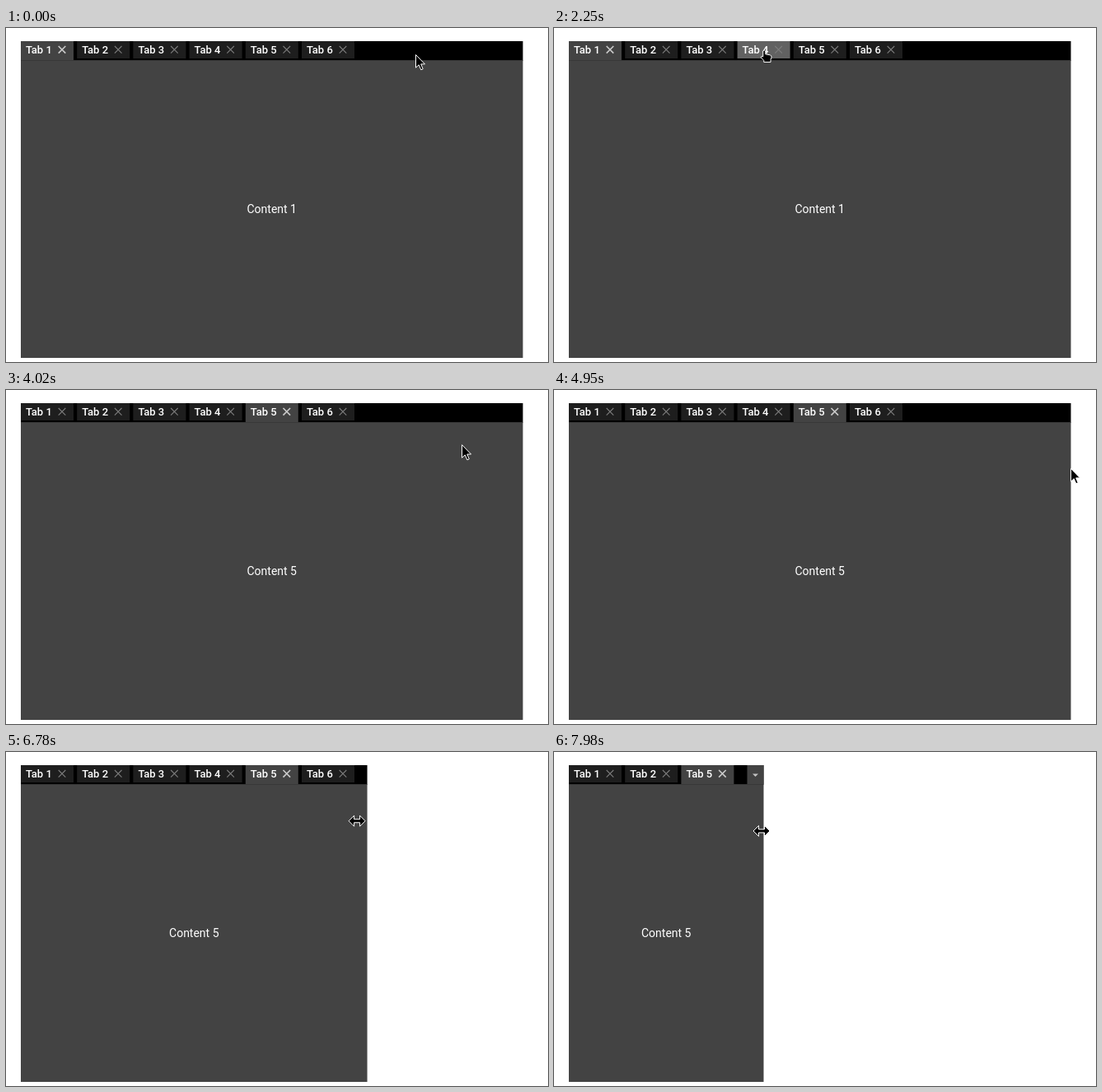
These frames come from a looping animation (658x406 px, 8 s). An HTML page:

```html
<!DOCTYPE html>
<html lang="en">
<head>
<meta charset="utf-8">
<title>Tab overflow</title>
<style>
  html, body { margin: 0; width: 100%; height: 100%; overflow: hidden; background: #fff; }
  svg { display: block; width: 658px; height: 406px; }
  text { font-family: Roboto, sans-serif; fill: #fff; }
  .tab text { font-size: 13px; font-weight: 500; }
  #label { font-size: 14px; text-anchor: middle; }
  .close { fill: none; }
  #cursor path { fill: #000; stroke: #fff; stroke-width: 1; stroke-linejoin: round; }
</style>
</head>
<body>
<svg viewBox="0 0 658 406">
  <rect id="head" x="18" y="16" height="23" fill="#000"/>
  <rect id="body" x="18" y="39" height="362" fill="#434343"/>
  <g id="tabs"></g>
  <rect id="rule" x="18" y="39" height="1" fill="#383838"/>
  <g id="more">
    <rect x="-20" y="16" width="20" height="23" fill="#434343"/>
    <path d="M-13.5 26.5h7l-3.5 3.5z" fill="#c4c4c4"/>
  </g>
  <text id="label" y="225"></text>
  <g id="cursor">
    <path id="arrow" d="M.5 .5V16.2L4.2 12.8L6.8 18.8L9.2 17.8L6.7 11.9H11.5Z"/>
    <path id="hand" d="M-1.5 1.5Q0-.8 1.5 1.5V5.2L7 6.2Q9 6.7 8.8 9L7.8 12V14.8H-.5V12.8L-4 9.2Q-4 7 -1.5 8.2Z"/>
    <path id="resize" d="M-10 0L-3.5-6.5V-2H3.5V-6.5L10 0L3.5 6.5V2H-3.5V6.5Z"/>
  </g>
</svg>
<script>
const LOOP = 8000, STEP = 30;
const LEFT = 18, FULL = 627.5, PITCH = 68.2, TAB = 64, MORE = 20;
const CLICK = 3030, GRAB = 5400, DRAG_LAG = 75;

// pointer path: time, x, y
const path = [
  [0, 497, 32], [390, 497, 32], [1170, 385, 28], [1320, 350, 26], [1980, 250, 27],
  [2160, 250, 27], [2640, 307, 23], [2760, 307, 23], [2790, 308, 22], [3030, 308, 22],
  [3300, 352, 31], [3810, 517, 56], [4620, 620, 91], [4800, 626, 94], [4920, 626, 94],
  [4950, 627, 95], [5370, 627, 95], [5400, 628, 92], [5460, 630, 92], [5880, 630, 92],
  [6195, 557, 82.5], [6270, 539, 81], [6615, 455, 82], [7215, 358.5, 92],
  [7290, 344, 93], [7425, 314, 94], [7905, 254.5, 96], [7980, 252, 96]
];

const $ = id => document.getElementById(id);
const show = (el, on) => el.setAttribute("display", on ? "inline" : "none");
const slope = (i, k) => path[i] && path[i + 1]
  ? (path[i + 1][k] - path[i][k]) / (path[i + 1][0] - path[i][0]) : 0;

// monotone tangent: no overshoot around rests
function tangent(i, k) {
  const a = slope(i - 1, k), b = slope(i, k);
  return a * b > 0 ? 2 * a * b / (a + b) : 0;
}

function pointer(t) {
  t = Math.max(0, Math.min(t, 7980));
  let i = 0;
  while (i < path.length - 2 && t >= path[i + 1][0]) i++;
  const span = path[i + 1][0] - path[i][0], u = (t - path[i][0]) / span;
  const at = k => {
    const p = path[i][k], q = path[i + 1][k];
    return p + (q - p) * u * u * (3 - 2 * u)
      + span * u * (1 - u) * ((1 - u) * tangent(i, k) - u * tangent(i + 1, k));
  };
  return { x: at(1), y: at(2) };
}

const tabs = [1, 2, 3, 4, 5, 6].map(n => {
  $("tabs").insertAdjacentHTML("beforeend",
    `<g class="tab"><rect y="16" width="${TAB}"/><text x="6" y="31">Tab ${n}</text>` +
    `<path class="close" d="M45.7 22l8.6 8.6m0-8.6l-8.6 8.6"/></g>`);
  const el = $("tabs").lastChild;
  const [box, , close] = el.children;
  return { n, el, box, close };
});

function visibleTabs(edge, active) {
  const fits = room => Math.floor((room - LEFT - TAB) / PITCH + 1);
  if (fits(edge) >= tabs.length) return tabs;
  const count = Math.max(1, fits(edge - MORE));
  const head = tabs.slice(0, count);
  return head.some(d => d.n === active) ? head : [...tabs.slice(0, count - 1), tabs[active - 1]];
}

function tabAt(p) {
  const dx = p.x - LEFT, i = Math.floor(dx / PITCH);
  return p.y < 37 && i < tabs.length && dx - i * PITCH < TAB ? i + 1 : 0;
}

function render(t) {
  const active = t < CLICK ? 1 : 5;
  const edge = t < GRAB ? FULL : Math.min(FULL, pointer(t - DRAG_LAG).x);
  const shown = visibleTabs(edge, active);
  const p = pointer(t), late = pointer(t - 60);
  const hover = tabAt(late);

  for (const id of ["head", "body", "rule"]) $(id).setAttribute("width", edge - LEFT);
  for (const d of tabs) {
    const slot = shown.indexOf(d), on = d.n === active, hot = d.n === hover;
    show(d.el, slot >= 0);
    if (slot < 0) continue;
    const x = LEFT + slot * PITCH;
    const hotClose = hot && on && Math.abs(late.x - x - 50) < 8;
    d.el.setAttribute("transform", `translate(${x})`);
    d.box.setAttribute("height", on ? 23 : 21);
    d.box.setAttribute("fill", on ? "#434343" : hot ? "#626262" : "#1e1e1e");
    d.close.setAttribute("stroke", hotClose ? "#fff" : on ? "#cacaca" : "#7c7c7c");
    d.close.setAttribute("stroke-width", hotClose ? 2 : on ? 1.6 : 1.1);
  }
  show($("more"), shown.length < tabs.length);
  $("more").setAttribute("transform", `translate(${edge})`);
  $("label").textContent = "Content " + active;
  $("label").setAttribute("x", (LEFT + edge) / 2);

  const kind = t >= GRAB ? "resize" : tabAt(pointer(t - 30)) ? "hand" : "arrow";
  for (const id of ["arrow", "hand", "resize"]) show($(id), id === kind);
  $("cursor").setAttribute("transform", `translate(${p.x} ${p.y})`);
}

const start = performance.now();
function tick() {
  const t = (performance.now() - start) % LOOP;
  render(Math.floor(t / STEP) * STEP);
  requestAnimationFrame(tick);
}
tick();
</script>
</body>
</html>
```
